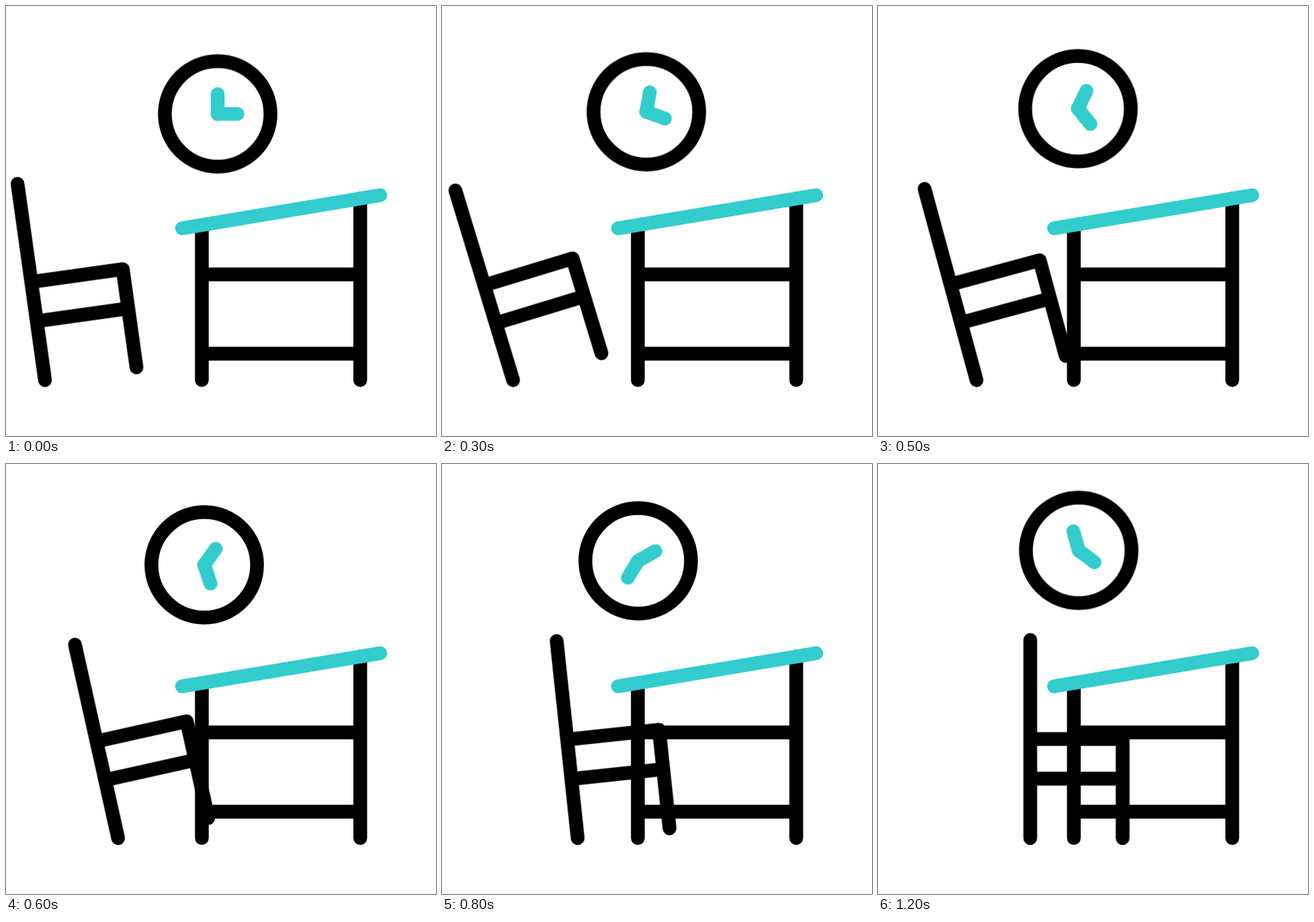
An HTML page for the animation above (1300 ms loop, 640 by 640 pixels).

```html
<!DOCTYPE html>
<html lang="en">
<head>
<meta charset="utf-8">
<title>Desk, chair and clock</title>
<style>
  html, body { margin: 0; width: 100%; height: 100%; overflow: hidden; background: #fff; }
  svg { display: block; width: 100%; height: 100%; }
  path, circle {
    fill: none; stroke: #000; stroke-width: 20.5;
    stroke-linecap: round; stroke-linejoin: round;
  }
  .accent { stroke: #3cc; }
</style>
</head>
<body>
<svg viewBox="0 0 640 640">
  <g id="clock">
    <circle r="78.6"/>
    <path id="slow" class="accent" d="M0 0V-29.5"/>
    <path id="fast" class="accent" d="M0 0V-29.5"/>
  </g>
  <!-- The chair pivots on the foot of its back leg. -->
  <g id="chair">
    <path d="M0 0V-295M0 -147.5H137.5V0M0 -88.5H137.5"/>
  </g>
  <path d="M291.5 556.8V326.5M527.25 556.8V286.5M291.5 399.5H527.25M291.5 517.5H527.25"/>
  <path class="accent" d="M262 330.9L557 281.6"/>
</svg>
<script>
  const STEP = 100, COUNT = 13;

  // Eased progress from 0 to 1 while n runs from a to b, in steps.
  function ease(n, a, b) {
    const t = Math.min(1, Math.max(0, (n - a) / (b - a)));
    return t * t * (3 - 2 * t);
  }

  // The clock drifts up and left, then veers off to the right.
  function clockPose(n) {
    const veer = ease(n, 9.5, 15);
    const x = 325.3 - 33.5 * ease(n, -5, 8.6) + 16 * veer;
    const y = 160.6 - 30 * ease(n, 0, 15) - 12 * veer;
    return `translate(${x}px, ${y}px)`;
  }

  // The chair slides to the desk, tipping back and settling upright.
  function chairPose(n) {
    const x = 46.6 + 180 * ease(n, -2, 11.03);
    const lean = 17.1 * (ease(n, -3.1, 3.4) - ease(n, 3.4, 11.1));
    return `translate(${x}px, 556.8px) rotate(${-lean}deg)`;
  }

  // Degrees turned by the slow hand; the fast one goes twice as far.
  function turn(n) {
    const t = n / (COUNT - 1);
    return t * (6.2 + t * (140 - 19.1 * t));
  }

  function play(id, pose) {
    const frames = Array.from({ length: COUNT + 1 }, (_, i) => ({
      offset: i / COUNT,
      transform: pose(i % COUNT),
      easing: "steps(1, end)"
    }));
    document.getElementById(id).animate(frames, { duration: COUNT * STEP, iterations: Infinity });
  }

  play("clock", clockPose);
  play("slow", n => `rotate(${turn(n)}deg)`);
  play("fast", n => `rotate(${90 + 2 * turn(n)}deg)`);
  play("chair", chairPose);
</script>
</body>
</html>
```
